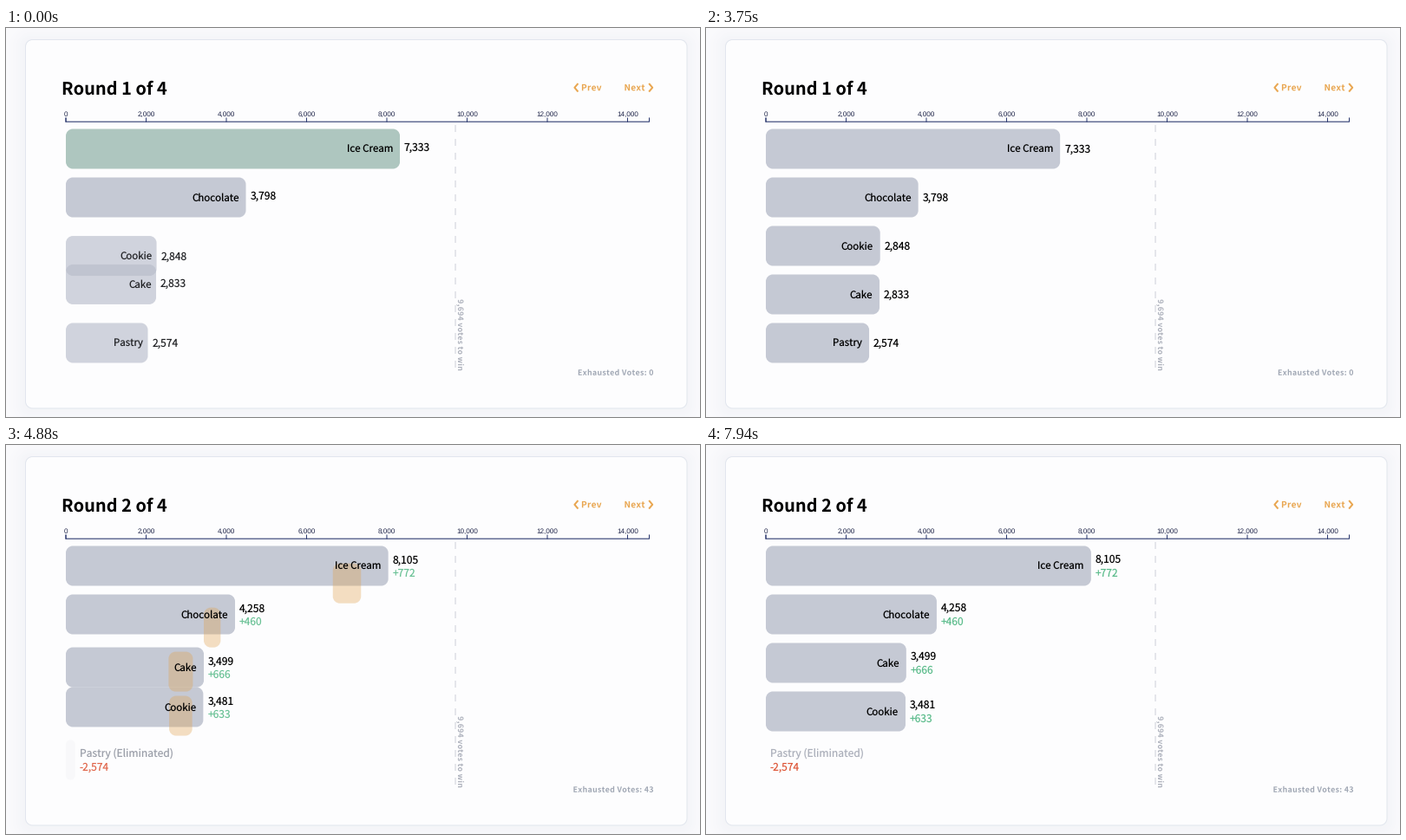
A matplotlib script that plays this animation: 800x449 px, repeating every 8000 ms.

```python
import matplotlib.pyplot as plt
from matplotlib.animation import FuncAnimation
from matplotlib.patches import PathPatch
from matplotlib.path import Path
from matplotlib.textpath import TextPath
from matplotlib.transforms import Affine2D

W, H, DPI = 800, 449, 100
LOOP, STEP = 8000, 40
SANS, AXIS_FONT = "Noto Sans CJK JP", "Liberation Sans"
plt.rcParams["text.hinting"] = "none"

LEFT, SCALE, GOAL = 69, 0.04625, 9694
TOP, BAR_H, PITCH, RADIUS = 116.5, 46, 56, 8
AXIS_Y = 108.2
RESET_START, ROUND2_START, MOVE, FADE = -609, 4184, 970, 500
TRANSFER_ALPHA = 0.38


def rgb(*channels):
    return tuple(c / 255 for c in channels)


PAGE, CARD, BORDER = rgb(250, 250, 252), rgb(253, 253, 254), rgb(226, 230, 238)
SHADOW = rgb(243, 244, 248)
BLACK, MUTED, SLATE = rgb(0, 0, 0), rgb(172, 176, 187), rgb(160, 167, 180)
BAR, WINNER, ORANGE = rgb(183, 188, 202), rgb(40, 173, 75), rgb(224, 162, 78)
LINK, NAVY, TICK_TEXT = rgb(233, 166, 80), rgb(45, 58, 112), rgb(30, 36, 72)
GAIN, LOSS, DASH = rgb(92, 188, 140), rgb(222, 88, 58), rgb(213, 216, 223)

NAMES = ["Ice Cream", "Chocolate", "Cookie", "Cake", "Pastry"]
# Per candidate: votes, row, still standing, change line shown
FINAL = [(12144, 0, 1, 1), (7138, 1, 1, 1), (0, 3, 0, 0), (0, 2, 0, 1), (0, 4, 0, 0)]
ROUND1 = [(7333, 0, 1, 0), (3798, 1, 1, 0), (2848, 2, 1, 0), (2833, 3, 1, 0), (2574, 4, 1, 0)]
ROUND2 = [(8105, 0, 1, 1), (4258, 1, 1, 1), (3481, 3, 1, 1), (3499, 2, 1, 1), (0, 4, 0, 1)]


def lerp(a, b, e):
    return a + (b - a) * e


def mix(a, b, e):
    return tuple(lerp(p, q, e) for p, q in zip(a, b))


def ease(t):
    t = min(max(t, 0), 1)
    return 4 * t ** 3 if t < 0.5 else 1 - 4 * (1 - t) ** 3


def x_of(votes):
    return LEFT + votes * SCALE


def rounded(x, y, w, h, r):
    w = max(w, 0.01)
    r = min(r, w / 2, h / 2)
    k = r * 0.448
    x1, y1 = x + w, y + h
    points = [(x + r, y), (x1 - r, y), (x1 - k, y), (x1, y + k), (x1, y + r),
              (x1, y1 - r), (x1, y1 - k), (x1 - k, y1), (x1 - r, y1),
              (x + r, y1), (x + k, y1), (x, y1 - k), (x, y1 - r),
              (x, y + r), (x, y + k), (x + k, y), (x + r, y), (x + r, y)]
    corner = [Path.LINETO] + [Path.CURVE4] * 3
    return Path(points, [Path.MOVETO] + corner * 4 + [Path.CLOSEPOLY])


fig = plt.figure(figsize=(W / DPI, H / DPI), dpi=DPI, facecolor=PAGE)
ax = fig.add_axes([0, 0, 1, 1])
ax.set_xlim(0, W)
ax.set_ylim(H, 0)
ax.axis("off")


def shape(path, color, alpha=1.0, z=1, **kw):
    return ax.add_patch(PathPatch(path, facecolor=color, alpha=alpha, zorder=z,
                                  **{"lw": 0, **kw}))


def line(xs, ys, color, width=1.0, **kw):
    return ax.plot(xs, ys, color=color, lw=width * 72 / DPI, snap=False, **kw)[0]


def text(x, y, s, size, color=BLACK, ha="left", font=SANS, weight="normal", z=6):
    return ax.text(x, y, s, fontsize=size * 72 / DPI, color=color, ha=ha,
                   va="baseline", family=font, weight=weight, zorder=z)


def spaced_path(s, size, gap):
    """Bold text with letter spacing, as a path with its baseline at y = 0."""
    prop = {"family": SANS, "weight": "bold"}

    def right(part):
        return TextPath((0, 0), part + "|", size=size, prop=prop).get_extents().x1

    base = right("")
    glyphs = [TextPath((right(s[:i]) - base + i * gap, 0), c, size=size, prop=prop)
              for i, c in enumerate(s) if c != " "]
    return Path.make_compound_path(*glyphs).transformed(Affine2D().scale(1, -1))


def spaced(x, y, s, size, color, gap, align="left", angle=0):
    path = spaced_path(s, size, gap)
    shift = path.get_extents().x1 if align == "right" else 0
    move = Affine2D().translate(-shift, 0).rotate_deg(angle).translate(x, y)
    return shape(path.transformed(move), color, z=6)


def draw_stage():
    for grow in range(22, 0, -2):
        shape(rounded(22 - grow, 15 - grow, 763 + 2 * grow, 426 + 2 * grow, 8 + grow),
              mix(PAGE, SHADOW, (1 - grow / 24) ** 1.5), z=0)
    shape(rounded(22.5, 13.5, 762.5, 425.5, 8), CARD, z=0.5, edgecolor=BORDER, lw=0.72)

    end = x_of(1.5 * GOAL)
    line([LEFT, LEFT, end, end], [104, AXIS_Y, AXIS_Y, 104], NAVY, 1.1)
    for votes in range(0, 14001, 2000):
        line([x_of(votes)] * 2, [104, AXIS_Y], NAVY)
        text(x_of(votes), 101.5, f"{votes:,}", 8.2, TICK_TEXT, "center", AXIS_FONT)

    goal_x = x_of(GOAL) + 0.7
    line([goal_x] * 2, [112, 393], DASH, 1.2, dashes=(8 / 1.2, 8 / 1.2),
         dash_capstyle="butt", zorder=0.8)
    spaced(521, 313.2, f"{GOAL:,} votes to win", 8.6, MUTED, 0.35, angle=90)

    spaced(663, 72.3, "Prev", 10, LINK, 0.3)
    spaced(712.5, 72.3, "Next", 10, LINK, 0.3)
    for tip, back in ((655.4, 658.8), (745.2, 741.8)):
        line([back, tip, back], [64.8, 68.8, 72.8], LINK, 2)


draw_stage()
title = text(64.5, 76.5, "", 20, weight="bold")
exhausted = {n: spaced(746, 400.8, f"Exhausted Votes: {n}", 8.8, SLATE, 0.33, "right")
             for n in (0, 43)}

EMPTY = rounded(0, 0, 0, 0, 0)
bars = [shape(EMPTY, BAR, z=2) for _ in NAMES]
transfers = [shape(EMPTY, ORANGE, z=3) for _ in NAMES[:4]]
labels = [text(0, 0, name, 11.5, ha="right") for name in NAMES]
values = [text(0, 0, "", 12.1) for _ in NAMES]
deltas = []
for name, (before, *_), (after, *_) in zip(NAMES, ROUND1, ROUND2):
    change = after - before
    deltas.append(text(0, 0, f"{change:+,}", 12, GAIN if change > 0 else LOSS,
                       weight="medium"))


def place_candidate(i, start, stop, e, second):
    votes, row, alive, lift = (lerp(a, b, e) for a, b in zip(start[i], stop[i]))
    tip, y = x_of(votes), TOP + row * PITCH
    base = y + BAR_H / 2 + 4.2
    ink = mix(MUTED, BLACK, alive)
    eliminated = second and not stop[i][2]

    bars[i].set_path(rounded(LEFT, y, tip - LEFT, BAR_H, RADIUS))
    bars[i].set_alpha(0.8 * alive)
    bars[i].set_facecolor(mix(BAR, WINNER, 1 - e) if i == 0 and start is FINAL else BAR)

    labels[i].set_position((tip - 8 + 13 * (1 - alive), base))
    labels[i].set_color(ink)
    labels[i].set_visible(not eliminated)

    values[i].set_position((tip + 5, base - 8 * lift))
    values[i].set_text(f"{NAMES[i]} (Eliminated)" if eliminated else f"{stop[i][0]:,}")
    values[i].set_color(ink)

    deltas[i].set_position((tip + 5, base + 8))
    deltas[i].set_alpha(e if second else 0)


def place_transfer(i, e, alpha):
    before, (after, row, *_) = ROUND1[i][0], ROUND2[i]
    x = lerp(LEFT - 9, x_of(before), e)
    y = TOP + lerp(4, row, e) * PITCH
    transfers[i].set_path(rounded(x, y, (after - before) * SCALE * e, BAR_H, RADIUS))
    transfers[i].set_alpha(alpha)


def update(frame):
    now = frame * STEP
    second = now >= ROUND2_START
    begin, start, stop = ((ROUND2_START, ROUND1, ROUND2) if second
                          else (RESET_START, FINAL, ROUND1))
    e = ease((now - begin) / MOVE)
    for i in range(len(NAMES)):
        place_candidate(i, start, stop, e, second)

    fade = 1 - ease((now - ROUND2_START - MOVE) / FADE)
    for i in range(len(transfers)):
        place_transfer(i, e, TRANSFER_ALPHA * e * fade if second else 0)

    title.set_text(f"Round {2 if second else 1} of 4")
    exhausted[0].set_visible(not second)
    exhausted[43].set_visible(second)
    return []


anim = FuncAnimation(fig, update, frames=LOOP // STEP, interval=STEP,
                     init_func=lambda: update(0), repeat=True, repeat_delay=0)
plt.show()
```
